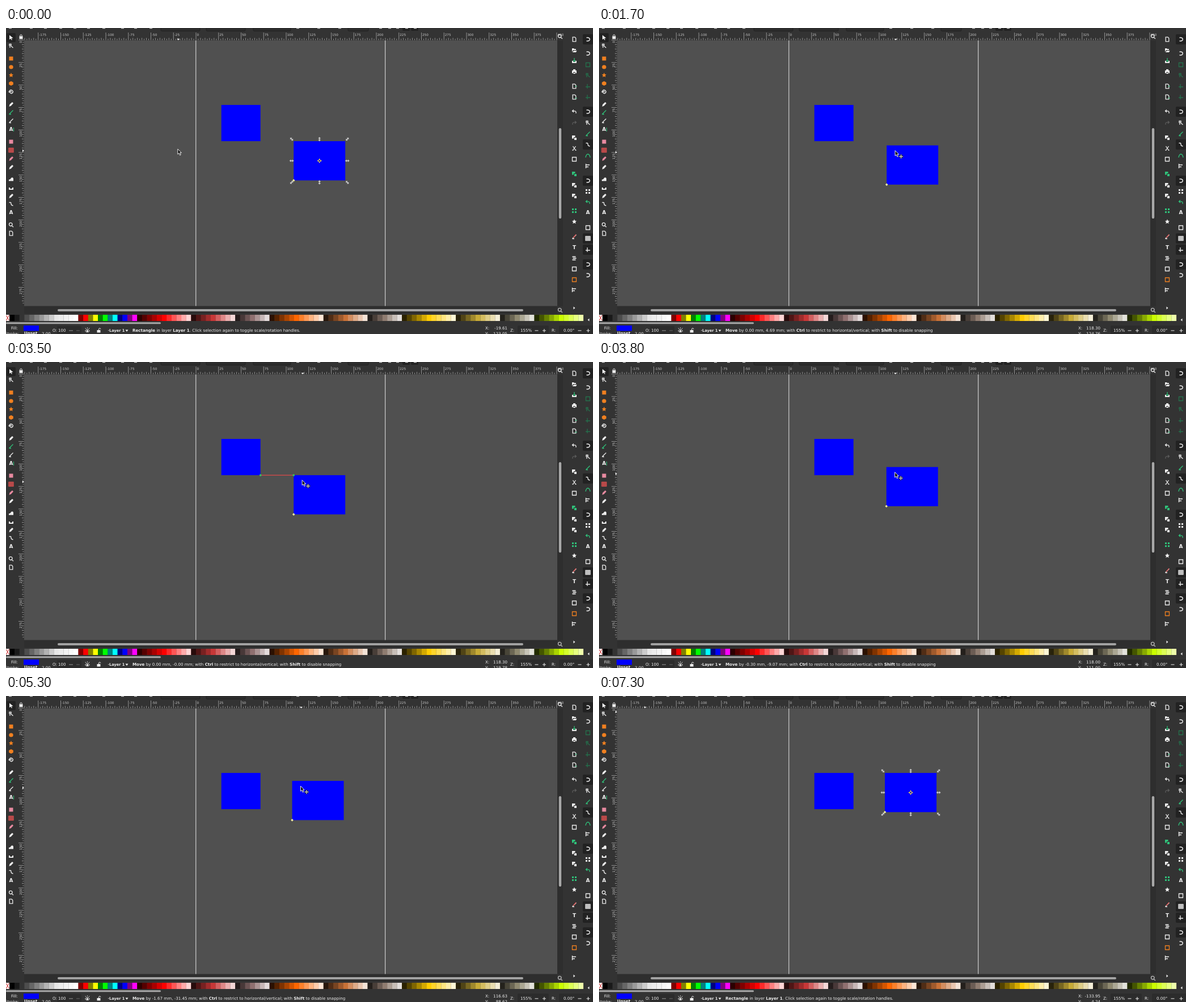
An HTML page that plays this animation: 1035x541 px, repeating every 7.9 s.

```html
<!DOCTYPE html>
<html lang="en">
<head>
<meta charset="utf-8">
<title>Snapping a rectangle</title>
<style>
html, body { margin: 0; width: 100%; height: 100%; overflow: hidden; background: #333; }
svg { display: block; width: 100%; height: 100%; }
text { font: 7.12px "DejaVu Sans", sans-serif; fill: #eee; white-space: pre; }
.ruler text { font-size: 5.7px; fill: #ccc; }
.b { font-weight: bold; }
</style>
</head>
<body>
<svg id="stage" viewBox="0 0 1035 541" preserveAspectRatio="none"></svg>
<script>
const MM = 1.59, X0 = 335, Y0 = 21.3;
const px = x => X0 + x * MM, py = y => Y0 + y * MM;
const stage = document.getElementById('stage');

const rect = (x, y, w, h, fill, more = '') =>
  `<rect x="${x}" y="${y}" width="${w}" height="${h}" fill="${fill}" ${more}/>`;
const fillPath = (d, color, more = '') => `<path d="${d}" fill="${color}" ${more}/>`;
const linePath = (d, color, width = 1) =>
  `<path d="${d}" fill="none" stroke="${color}" stroke-width="${width}"/>`;
const label = (x, y, s, more = '') => `<text x="${x}" y="${y}" ${more}>${s}</text>`;
const at = (x, y, body, turn = 0) =>
  `<g transform="translate(${x} ${y}) rotate(${turn})">${body}</g>`;

// Rulers: one small tick each 2.5 mm, a long one with a number each 25 mm
function rulers() {
  let ticks = '', names = '';
  for (let i = -76; i <= 160; i++) {
    const x = px(i * 2.5), big = i % 10 === 0;
    if (x < 32 || x > 971) continue;
    ticks += `M${x.toFixed(2)} ${big ? 8 : i % 2 ? 19 : 17.5}V21.5`;
    if (big) names += label(x + 1.5, 13.6, i * 2.5);
  }
  for (let i = 0; i < 118; i++) {
    const y = py(i * 2.5), big = i % 10 === 0;
    if (y > 491) break;
    ticks += `M${big ? 22 : i % 2 ? 29.5 : 28} ${y.toFixed(2)}H31.5`;
    if (big) names += at(28, y + 1.5, label(0, 0, i * 2.5, 'text-anchor="end"'), -90);
  }
  return `<g class="ruler">${linePath(ticks, '#bbb', .7)}${names}</g>`;
}

function palette() {
  const greys = [0, 10, 20, 30, 40, 50, 60, 70, 80, 90, 92.5, 95, 97.5, 100];
  const colors = greys.map(l => `hsl(0 0% ${l}%)`);
  for (const h of [0, 60, 120, 180, 240, 300])
    colors.push(`hsl(${h} 100% 25%)`, `hsl(${h} 100% 50%)`);
  for (const h of [0, 24, 48, 72])
    for (const [sat, n] of [[100, 12], [57, 10], [12.5, 8]])
      for (let i = 1; i < n; i++) colors.push(`hsl(${h} ${sat}% ${100 * i / n}%)`);
  const w = 8.645;
  return rect(0, 507, 6, 11, '#fff') + linePath('M0 517.5L5.5 507.5M0 508L5.5 517', '#c22', 1) +
    colors.slice(0, 117).map((c, i) => rect((6.5 + i * w).toFixed(2), 507, w + .1, 11, c)).join('');
}

const WHITE = '#eee', ORANGE = '#f08020', GREEN = '#2fc27a', RED = '#e05050';
const filled = {
  arrow: 'M-3-4.500L3.500 .8 .6 1.200 2 4 .8 4.500-.6 1.700-3 3.400Z',
  box: 'M-3.500-3.500h7v7h-7Z',
  disc: 'M-3.700 0a3.700 3.500 0 1 0 7.400 0a3.700 3.500 0 1 0-7.400 0Z',
  star: 'M0-4L1.200-1.200 4-1 2 1 2.600 4 0 2.500-2.600 4-2 1-4-1-1.200-1.200Z',
  cube: 'M0-4L3.800-2V2L0 4-3.800 2V-2Z',
  pen: 'M-3.500 4L-2.500 0 2-4 4-2 0 2.500Z',
  blob: 'M-4 3.500V1Q-1 1 0-2Q3-4 4-1V3.500Z',
  folder: 'M-4-3H-1L0-2H3V0H-2L-4 3.500ZM-1 1H4.500L3 4H-3Z',
  tray: 'M-4 0H-2V2H2V0H4V4H-4Z',
  printer: 'M-2-4H2V-2H4V3H2V1H-2V3H-4V-2H-2ZM-1.500 2H1.500V4H-1.500Z',
  pair: 'M-4-4H1.500V-1H-1V1.500H-4ZM0 0H4V4H0Z',
  tri: 'M-1.500-2.500L1.500 0-1.500 2.500Z',
  bars: 'M-3.500-3.500h6v1.700h-6ZM-2.500-.8h6v1.700h-6ZM-3.500 2h6v1.700h-6Z',
  quad: 'M-4-4H-1V-1H-4ZM1-4H4V-1H1ZM-4 1H-1V4H-4ZM1 1H4V4H1Z'
};
const lined = {
  node: 'M-3-3.500H0V-1H-3ZM0 0L3.500 3M-2 0V3',
  spiral: 'M0 .5Q1-1-.7-1.400-2.500-1-2.200 1-1 3 1 2.700 3.600 1.500 3.300-1 2-3.700-1-3.500-4-2-3.700 1',
  slash: 'M-3.500 3.500L3.500-3.500M-3.500 3.500H0',
  zoom: 'M-3.500-.8a2.800 2.800 0 1 0 5.600 0a2.800 2.800 0 1 0-5.600 0M1.300 1.500L4 4',
  page: 'M-2.800-3.800H1L2.800-2V3.800H-2.800Z',
  link: 'M-3.500-2.500H-1Q0-2.500 0 0T3.500 3',
  undo: 'M-1-3.500L-3.500-1.200-1 1M-3.500-1.200H1Q3.500-1 3 3',
  redo: 'M1-3.500L3.500-1.200 1 1M3.500-1.200H-1Q-3.500-1-3 3',
  cut: 'M-2.500-4L2 2.500M2.500-4L-2 2.500M-3.500 3h2M1.500 3h2',
  magnet: 'M-2.500-3H0Q3.300-2.500 3.300 0T0 3H-2.500',
  frame: 'M-3.500-3.500H3.500V3.500H-3.500Z',
  grid: 'M-4-3.500H4V3.500H-4ZM-4-1.200H4M-4 1.200H4M-1.400-3.500V3.500M1.400-3.500V3.500',
  cross: 'M-4 1H4M-1-4V4',
  curve: 'M-4 3Q-3-3 0-3T4 3',
  align: 'M-3.500-4V4M-3.500-2H3M-3.500 1.500H1'
};
function icon(x, y, name, color = WHITE) {
  const body = name.length === 1 ? label(0, 3.2, name, `text-anchor="middle" class="b" style="font-size:9px;fill:${color}"`)
    : filled[name] ? fillPath(filled[name], color) : linePath(lined[name], color, 1.3);
  return at(x, y, body);
}
const column = (x, items) => items.split(' ').map(s => {
  const [y, name, c] = s.split(':');
  return icon(x, y, name, { o: ORANGE, g: GREEN, r: RED, p: '#e88aa0', d: '#5c5c5c', m: '#24704c' }[c]);
}).join('');

function chrome() {
  let s = rect(0, 0, 1035, 541, '#333');
  for (const [x, w] of [[273, 69], [353, 69], [436, 66], [603, 36]])
    s += rect(x, -9, w, 14.5, '#2c2c2c', 'stroke="#222" rx="2"');
  s += rect(699, -9, 13, 14, '#222', 'rx="2"') + rect(714, -9, 13, 14, '#222', 'rx="2"');
  for (const x of [5, 42, 67, 94, 119, 143, 170, 203, 226, 253, 512, 549, 586, 658, 674, 688, 704, 719])
    s += rect(x, 0, 5, 1.2, '#ccc');
  s += rect(32, 22, 940, 469.500, '#505050');
  s += linePath('M334.800 22V491.500M668.700 22V491.500', '#e6e6e6', 1);
  s += rulers();
  s += rect(972, 22, 10, 470, '#2e2e2e') + rect(974.800, 177, 4.400, 160, '#a8a8a8', 'rx="2.2"');
  s += rect(32, 492, 940, 13, '#2e2e2e') + rect(91, 497, 821, 4, '#a2a2a2', 'rx="2"');
  s += palette() + rect(0, 520.300, 273, 3, '#a8a8a8', 'rx="1.500"');
  s += rect(1, 9, 16, 16, '#222', 'rx="2"');
  s += column(9, '17:arrow 32:node 54:box:o 69:disc:o 83:star:o 98:cube:o 113:spiral 135:pen 149:slash:g 164:slash 179:A 201:box:p 216:grid:r 231:pen:p 246:pen 267:blob 282:tray 297:pen 311:link 326:A 348:zoom 363:page');
  s += linePath('M13.500 176V183', GREEN, 1);
  s += rect(23.500, 14.500, 6, 5, WHITE) + linePath('M24.800 15V13.500a1.700 1.700 0 0 1 3.400 0V15', WHITE, 1);
  s += icon(977, 15, 'zoom') + icon(977, 499, 'zoom', '#bbb');
  s += column(1002, '20:page 39:folder 58:tray 77:printer 103:page 122:page 148:undo 168:redo:d 194:pair 213:cut 232:frame 258:pair:g 278:pair 297:pair 323:quad:g 342:star 369:slash 388:T 407:bars 426:frame 445:frame:o 463:align 495:tri');
  s += linePath('M1002 53V59M1000 57L1002 59.500 1004 57M1003 103H1007M1003 124H1007', GREEN, 1.200);
  s += linePath('M1005 365L1000 371', RED, 1.200);
  for (const y of [20, 148, 206, 270, 372, 392, 418]) s += rect(1017, y - 9, 18, 18, '#222', 'rx="2"');
  s += column(1026, '20:magnet 45:magnet 65:frame:m 84:node:m 103:cross:m 122:cross:m 148:magnet 168:node 187:slash:g 206:link 226:curve:g 244:align 270:magnet 289:quad 308:undo:g 326:A 353:frame 372:grid 392:cross 418:magnet 437:magnet');
  s += at(1027, 516, fillPath(filled.tri, WHITE), 180);

  s += label(9, 533.300, 'Fill:') + label(-2, 542.700, 'Stroke:') + rect(31, 526, 27, 9.500, '#00f');
  s += label(32, 542.300, 'Unset', 'class="b"') + label(63, 542.700, '2.00') + label(82, 537.300, 'O:');
  s += rect(90, 527, 43, 14, '#2c2c2c', 'rx="2"') + label(92, 537.300, '100');
  s += linePath('M111 535H118', '#999') + linePath('M124 535H130', '#666');
  s += linePath('M139.500 535.500Q143.500 530 147.500 535.500Q143.500 540 139.500 535.500ZM141 532L140 530.500M143.500 531V529.500M146 532L147 530.500', WHITE, 1);
  s += fillPath(filled.disc, WHITE, 'transform="translate(143.500 535.500) scale(.45)"');
  s += rect(160.500, 534, 6, 4.500, WHITE) + linePath('M163.500 534V532.500a1.700 1.700 0 0 1 3.400 0', WHITE);
  s += label(179.500, 537.300, '·Layer 1', 'class="b" style="font-size:6.600px"') + fillPath('M210.500 533.500H215.500L213 537Z', WHITE);
  s += label(845, 533.300, 'X:') + label(845, 542.600, 'Y:') + label(889, 537.300, 'Z:') + label(962, 537.300, 'R:');
  s += rect(902, 526, 55, 16, '#2c2c2c', 'rx="2"') + rect(975, 526, 62, 16, '#2c2c2c', 'rx="2"');
  s += label(907, 537.300, '155%') + label(983, 537.300, '0.00°');
  for (const x of [935.500, 949, 1011.500, 1026.500]) s += linePath(`M${x - 3} 535h6`, WHITE);
  s += linePath('M949 532v6M1026.500 532v6', WHITE);
  return s;
}

// Moving parts
const BOX = { x: 507.200, y: 200.100, w: 91, h: 69.300 };
const doubleArrow = turn => fillPath('M-4 0L-1-2.800V-1H1V-2.800L4 0 1 2.800V1H-1V2.800Z', '#d0d0d0',
  `stroke="#444" stroke-width=".4" transform="rotate(${turn})"`);
function handles() {
  const { w, h } = BOX, gap = 3.600;
  let s = '';
  for (const i of [-1, 0, 1]) for (const j of [-1, 0, 1]) {
    if (!i && !j) continue;
    const turn = !j ? 0 : !i ? 90 : 45 * i * j;
    s += at(w / 2 + i * (w / 2 + gap), h / 2 + j * (h / 2 + gap), doubleArrow(turn));
  }
  return s + at(w / 2, h / 2, fillPath('M0-4.300L1.500-1.500 4.300 0 1.500 1.500 0 4.300-1.500 1.500-4.300 0-1.500-1.500Z', '#ffe640') +
    fillPath('M0-1.800L1.800 0 0 1.800-1.800 0Z', '#1010c0'));
}
const dot = '<circle r="1.900" fill="#35c060"/>';

stage.innerHTML = chrome() + rect(379.700, 136, 69, 64.100, '#00f') +
  `<g id="box">${rect(0, 0, BOX.w, BOX.h, '#00f')}<g id="handles">${handles()}</g>` +
  at(0, BOX.h, fillPath('M0-2.300L2.300 0 0 2.300-2.300 0Z', '#f0eca0')) + '</g>' +
  `<g id="snap"><path id="guide" stroke="#e04848" stroke-width="1.100"/><g id="from">${dot}</g><g id="to">${dot}</g></g>` +
  fillPath('M-2.500 19H2.500L0 21.800Z', WHITE, 'id="markX"') + fillPath('M29-2.500V2.500L31.800 0Z', WHITE, 'id="markY"') +
  '<g id="cursor">' + fillPath('M0 0V9.200L2.100 7.300 3.800 11 5.400 10.200 3.800 6.700H6.600Z', '#111', 'stroke="#fff" stroke-width=".9"') +
  '<g id="cross">' + at(10.500, 10.500, fillPath('M0-4L1.800-1.800H.8V-.8H1.800V-1.800L4 0 1.800 1.800V.8H.8V1.800H1.800L0 4-1.800 1.800H-.8V.8H-1.800V1.800L-4 0-1.800-1.800V-.8H-.8V-1.800H-1.800Z', '#fff', 'stroke="#111" stroke-width=".8"')) + '</g></g>' +
  label(884, 533.300, '', 'id="readX" text-anchor="end"') + label(884, 542.600, '', 'id="readY" text-anchor="end"') +
  label(223, 537.300, '', 'id="status"');

const $ = Object.fromEntries([...stage.querySelectorAll('[id]')].map(e => [e.id, e]));
const move = (e, x, y) => e.setAttribute('transform', `translate(${x.toFixed(2)} ${y.toFixed(2)})`);
const show = (e, on) => e.setAttribute('visibility', on ? 'visible' : 'hidden');
const bold = s => `<tspan class="b">${s}</tspan>`;

const LOOP = 7900, STEP = 100, GRAB = 1200, DROP = 6800;
const grab = { x: 118.304, y: 120.07 };
// Pointer path: time in ms, ruler position in mm
const path = [
  [100, -19.61, 123.05], [400, 30, 122.6], [900, 110, 120.6], [1100, grab.x, grab.y],
  [GRAB, grab.x, grab.y], [1500, grab.x, 126.6], [1600, grab.x, 126.6], [1700, grab.x, 124.76],
  [1800, grab.x, 122], [1900, grab.x, 122], [2000, grab.x, 121], [2300, grab.x, 119.78],
  [3500, grab.x, 119.78], [3800, 118, 111], [3900, 118, 111], [4000, 117.8, 108.5],
  [4100, 117.8, 108.5], [4400, 117.286, 100.54], [5000, 117.286, 100.54], [5300, 116.634, 88.62],
  [5800, 116.346, 82], [6200, 116.346, 80.49], [6700, 116.346, 80.49], [7300, -159.7, -25]
];
// Vertical shifts that snap, with the point each one snaps to
const snaps = [
  { dy: -.001, x: 448.700, y: 200.100 }, { dy: -20.16, x: 414.200, y: 168 }, { dy: -40.31, x: 448.700, y: 136 }
];

function pointer(t) {
  const i = path.findIndex(k => k[0] >= t);
  if (i === 0) return path[0].slice(1);
  if (i < 0) return path[path.length - 1].slice(1);
  const [a, b] = [path[i - 1], path[i]], f = (t - a[0]) / (b[0] - a[0]);
  return [1, 2].map(n => a[n] + (b[n] - a[n]) * f);
}

function draw(time) {
  const t = Math.floor(time % LOOP / STEP) * STEP;
  const [x, y] = pointer(t), dragging = t > GRAB && t < DROP;
  let dx = 0, dy = 0, snap;
  if (dragging) {
    dx = x - grab.x;
    dy = y - grab.y;
    snap = snaps.find(s => Math.abs(s.dy - dy) < 1.2);
    if (snap) dy = snap.dy;
  } else if (t >= DROP) [dx, dy] = [-1.96, -40.31];

  const bx = BOX.x + dx * MM, by = BOX.y + dy * MM, cx = px(x), cy = py(y);
  move($.box, bx, by);
  show($.handles, !dragging);
  show($.snap, snap);
  if (snap) {
    $.guide.setAttribute('d', `M${snap.x} ${snap.y}L${bx} ${by}`);
    move($.from, snap.x, snap.y);
    move($.to, bx, by);
  }
  move($.cursor, cx - 1, cy - 3);
  show($.cursor, t < 7300);
  show($.cross, t < 7300 && cx > bx && cx < bx + BOX.w && cy > by && cy < by + BOX.h);
  move($.markX, cx, 0);
  move($.markY, 0, py(Math.max(y, 4.24)));
  $.readX.textContent = Math.max(x, -133.95).toFixed(2);
  $.readY.textContent = Math.max(y, 4.24).toFixed(2);
  const status = dragging
    ? `${bold('Move')} by ${dx.toFixed(2)} mm, ${dy.toFixed(2)} mm; with ${bold('Ctrl')} to restrict to horizontal/vertical; with ${bold('Shift')} to disable snapping`
    : `${bold('Rectangle')} in layer ${bold('Layer 1')}. Click selection again to toggle scale/rotation handles.`;
  if (draw.last !== status) $.status.innerHTML = draw.last = status;
}

const start = performance.now();
function loop() {
  draw(performance.now() - start);
  requestAnimationFrame(loop);
}
loop();
</script>
</body>
</html>
```
